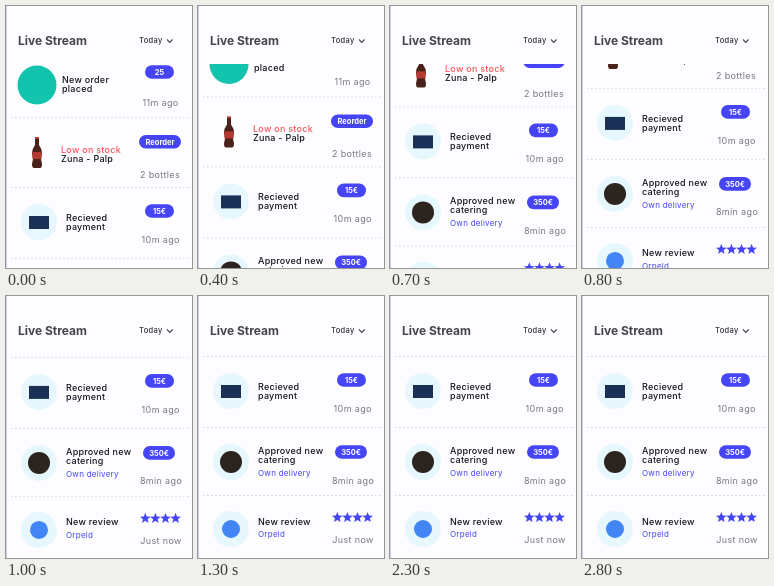
An HTML page that plays this animation: 186x262 px, repeating every 2900 ms.

```html
<!DOCTYPE html>
<html lang="en">
<head>
<meta charset="utf-8">
<title>Live Stream</title>
<style>
  html, body { margin: 0; width: 100%; height: 100%; overflow: hidden; background: #fdfdff; }
  svg { display: block; width: 186px; height: 262px; font-family: Inter, sans-serif; }
  .title { font-size: 12px; font-weight: 700; fill: #45454f; }
  .today { font-size: 7.5px; font-weight: 500; letter-spacing: .35px; fill: #30303a; }
  .name { font-size: 9px; font-weight: 500; letter-spacing: .25px; fill: #15151c; }
  .alert { fill: #fb565c; }
  .sub { font-size: 8px; letter-spacing: .25px; fill: #4747f5; }
  .note { font-size: 9px; letter-spacing: .35px; fill: #777780; text-anchor: middle; }
  .pill { fill: #4545f6; }
  .label { font-size: 7.5px; font-weight: 700; fill: #fff; text-anchor: middle; }
  .halo { fill: #e6f8fd; }
  .rule { stroke: #d3d3de; stroke-dasharray: 1.5 2.5; }
</style>
</head>
<body>
<svg viewBox="0 0 186 262">
  <clipPath id="view"><rect y="58" width="186" height="204"/></clipPath>
  <rect width="186" height="262" fill="#fdfdff"/>
  <rect width="1" height="262" fill="#cfcdff"/>
  <text class="title" x="12" y="38.5">Live Stream</text>
  <text class="today" x="133" y="36.7">Today</text>
  <path d="M161 33.5l2.8 2.8 2.8-2.8" fill="none" stroke="#45454f" stroke-width="1.2"/>
  <g clip-path="url(#view)">
    <g id="list">
      <circle cx="31" cy="79" r="19.5" fill="#12c4ae"/>
      <g id="bottle">
        <path d="M29 132h4v7q3 4 3 8l-1 6 1 5q0 4-2 4h-6q-2 0-2-4l1-5-1-6q0-4 3-8z" fill="#4a211b"/>
        <rect x="26.5" y="146" width="9" height="7" fill="#b63a32"/>
        <rect x="29" y="131" width="4" height="2" fill="#b63a32"/>
      </g>
      <circle class="halo" cx="33" cy="216" r="18"/>
      <rect x="23" y="210" width="20" height="13" fill="#1b3056"/>
      <circle class="halo" cx="33" cy="287" r="18"/>
      <circle cx="33" cy="287" r="11" fill="#2b241f"/>
      <circle class="halo" cx="33" cy="354" r="18"/>
      <circle cx="33" cy="354" r="9" fill="#4285f4"/>
    </g>
  </g>
</svg>
<script>
const LOOP = 2900, START = 160, DURATION = 890, DISTANCE = 121;
const list = document.getElementById('list');

function add(tag, attrs, text = '') {
  const el = document.createElementNS('http://www.w3.org/2000/svg', tag);
  for (const key in attrs) el.setAttribute(key, attrs[key]);
  el.textContent = text;
  list.append(el);
}
const write = (cls, x, y, text) => add('text', { class: cls, x, y }, text);

function pill(x, y, width, text) {
  add('rect', { class: 'pill', x: x - width / 2, y: y - 6.8, width, height: 13.6, rx: 6.8 });
  write('label', x, y + 2.7, text);
}

function star(cx, cy) {
  const points = Array.from({ length: 10 }, (_, i) => {
    const radius = i % 2 ? 2.4 : 5.6, angle = i * Math.PI / 5;
    return [cx + radius * Math.sin(angle), cy - radius * Math.cos(angle)];
  });
  add('polygon', { class: 'pill', points: points.join(' ') });
}

for (const y of [111.5, 181.5, 252.5, 320.5])
  add('line', { class: 'rule', x1: 5, x2: 183, y1: y, y2: y });

write('name', 56, 76.5, 'New order');
write('name', 56, 86, 'placed');
pill(153.5, 66, 29, '25');
write('note', 154.5, 100, '11m ago');

write('name alert', 55, 146.5, 'Low on stock');
write('name', 55, 156, 'Zuna - Palp');
pill(154, 135.8, 42, 'Reorder');
write('note', 154, 172, '2 bottles');

write('name', 60, 215, 'Recieved');
write('name', 60, 224, 'payment');
pill(153.5, 205, 29, '15€');
write('note', 154.7, 236.8, '10m ago');

write('name', 60, 279, 'Approved new');
write('name', 60, 288, 'catering');
write('sub', 60, 301, 'Own delivery');
pill(153, 277, 32, '350€');
write('note', 155, 308.5, '8min ago');

write('name', 60, 349.5, 'New review');
write('sub', 60, 362, 'Orpeld');
for (let i = 0; i < 4; i++) star(139.3 + i * 10.1, 342.5);
write('note', 155, 367.8, 'Just now');

function draw() {
  const time = performance.now() % LOOP;
  const part = Math.min(1, Math.max(0, (time - START) / DURATION));
  const eased = (1 - Math.cos(Math.PI * part)) / 2;
  list.setAttribute('transform', `translate(0 ${-DISTANCE * eased})`);
  requestAnimationFrame(draw);
}
draw();
</script>
</body>
</html>
```
